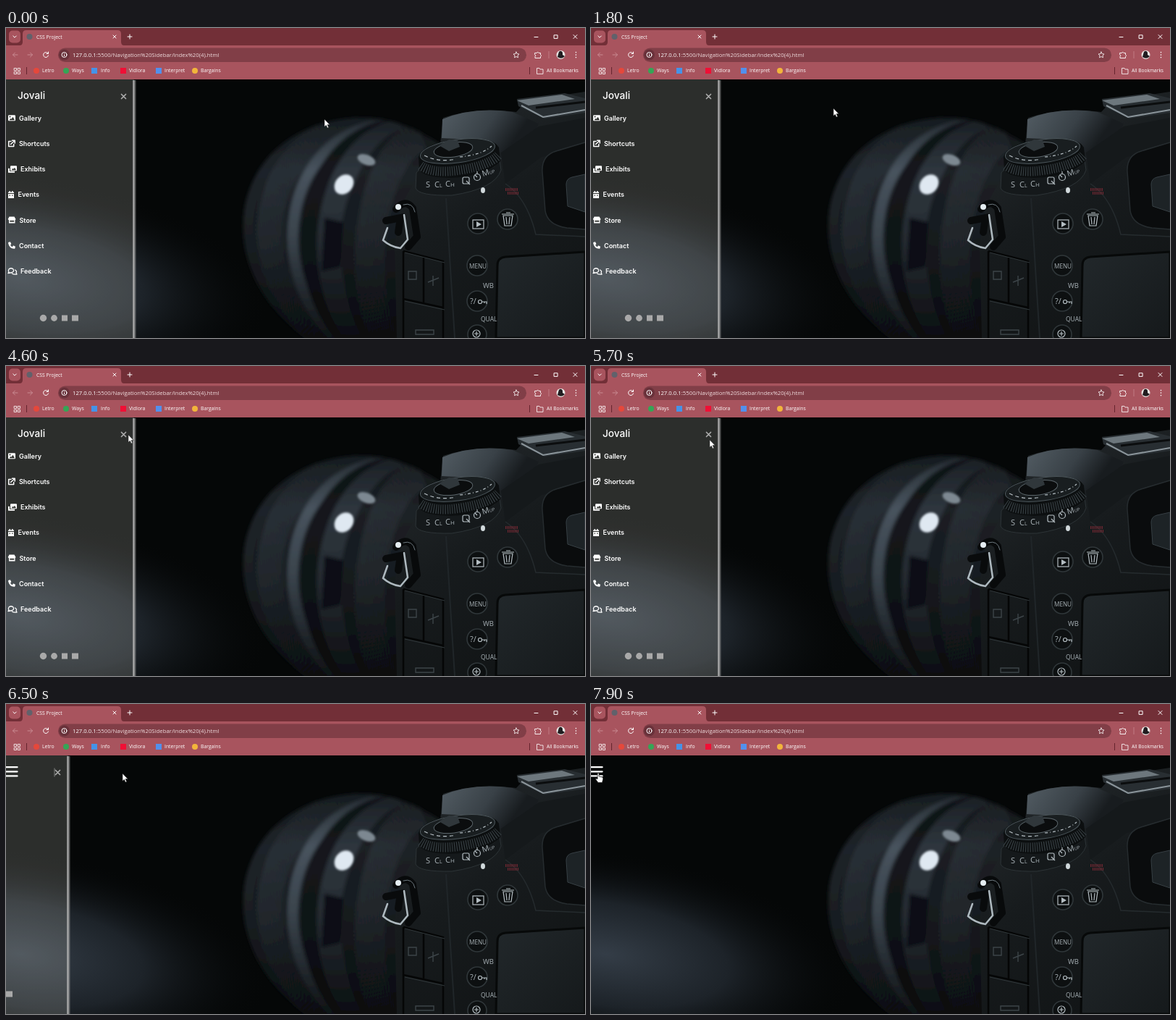
These frames come from a looping animation (800 by 428 pixels, 8000 ms). An HTML page:

```html
<!DOCTYPE html>
<html lang="en">
<head>
<meta charset="utf-8">
<title>Sidebar</title>
<style>
html,body{margin:0;width:100%;height:100%;overflow:hidden;background:#050707}
svg{display:block;width:100%;height:100%}
.ui{font:6.85px "Open Sans","Noto Sans",sans-serif;fill:#fff}
.side{font:600 9px Inter,sans-serif;fill:#fff}
.cam{font:500 11px "Open Sans",sans-serif;fill:#aab3b8}
.line{fill:none;stroke:#fff;stroke-width:1;stroke-linecap:round;stroke-linejoin:round}
.dim{stroke:#c98b92}
.key{fill:#0d1011;stroke:#30373a;stroke-width:1.6}
.mark{fill:none;stroke:#b4bdc2;stroke-width:1.2}
</style>
</head>
<body>
<svg viewBox="0 0 800 428">
<defs>
  <radialGradient id="haze" cx="20" cy="345" r="340" gradientUnits="userSpaceOnUse" gradientTransform="matrix(1 .12 0 .42 0 198)">
    <stop stop-color="#343d47"/><stop offset=".5" stop-color="#1d2329"/><stop offset="1" stop-color="#060809" stop-opacity="0"/>
  </radialGradient>
  <linearGradient id="lensShade" x1="0" y1="120" x2="0" y2="428" gradientUnits="userSpaceOnUse">
    <stop stop-color="#06080a" stop-opacity=".55"/><stop offset=".25" stop-color="#06080a" stop-opacity=".05"/>
    <stop offset=".55" stop-color="#06080a" stop-opacity=".25"/><stop offset="1" stop-color="#06080a" stop-opacity=".88"/>
  </linearGradient>
  <linearGradient id="body" x1="550" y1="120" x2="740" y2="428" gradientUnits="userSpaceOnUse">
    <stop stop-color="#24292c"/><stop offset=".45" stop-color="#171b1d"/><stop offset="1" stop-color="#111415"/>
  </linearGradient>
  <linearGradient id="hump" x1="605" y1="112" x2="690" y2="172" gradientUnits="userSpaceOnUse">
    <stop stop-color="#525c63"/><stop offset=".6" stop-color="#394147"/><stop offset="1" stop-color="#181c1f"/>
  </linearGradient>
  <linearGradient id="screen" x1="0" y1="0" x2="1" y2="1">
    <stop stop-color="#22282b"/><stop offset="1" stop-color="#15191b"/>
  </linearGradient>
  <linearGradient id="edge">
    <stop stop-color="#aaa" stop-opacity=".15"/><stop offset=".3" stop-color="#b5b5b5"/><stop offset="1" stop-color="#999" stop-opacity="0"/>
  </linearGradient>
  <filter id="soft" x="-20%" y="-20%" width="140%" height="140%"><feGaussianBlur stdDeviation="2.6"/></filter>
  <filter id="glow" x="-50%" y="-50%" width="200%" height="200%"><feGaussianBlur stdDeviation="1.5"/></filter>
  <filter id="slight"><feGaussianBlur stdDeviation=".6"/></filter>
  <clipPath id="barrel"><path d="M490 124C310 130 270 330 420 432H600V160Q540 122 490 124"/></clipPath>
</defs>

<rect width="800" height="428" fill="#050707"/>
<rect y="71" width="800" height="357" fill="url(#haze)"/>

<!-- lens -->
<g filter="url(#soft)">
  <g clip-path="url(#barrel)">
    <rect x="320" y="110" width="290" height="330" fill="#1d2227"/>
    <g id="bands" fill="none"></g>
    <rect x="320" y="110" width="290" height="330" fill="url(#lensShade)"/>
    <path d="M440 262L466 268 462 330 436 336Z" fill="#0c0f12"/>
  </g>
</g>
<g filter="url(#glow)">
  <ellipse cx="467" cy="216" rx="12" ry="15" fill="#dfe8f1" transform="rotate(40 467 216)"/>
  <ellipse cx="498" cy="182" rx="13" ry="7" fill="#7d8891" transform="rotate(22 498 182)"/>
</g>

<!-- camera body -->
<path d="M540 430L537 300 546 245 572 198 600 160 604 124Q650 109 705 116L720 100 800 88V430Z" fill="url(#body)"/>
<path d="M603 126Q646 108 700 116L736 132 728 150 684 172 640 154 602 152Z" fill="url(#hump)"/>
<path d="M684 172L736 136 800 124V165L740 178 690 215Z" fill="#15191b"/>
<g filter="url(#slight)">
  <path d="M706 98L772 90 800 97V117L744 125 708 108Z" fill="#282e32"/>
  <path d="M706 100L768 92 786 98 722 107Z" fill="#6d777d"/>
  <path d="M712 107L742 123 800 113" fill="none" stroke="#8a949a" stroke-width="2"/>
  <path d="M732 110L800 102" stroke="#0b0d0e" stroke-width="3"/>
</g>
<path d="M800 158L760 170Q740 176 741 198L745 252Q748 272 775 276L800 278" fill="#0a0c0d" stroke="#262c2f" stroke-width="1.5"/>
<path d="M800 202L782 206Q774 208 774 216L776 246 800 254Z" fill="#1d2326" stroke="#363f44"/>
<path d="M690 215Q720 235 732 285L800 288" fill="none" stroke="#252b2e" stroke-width="1.5"/>

<!-- mode dial -->
<path d="M567 200Q570 190 620 197T682 183L684 196Q676 222 616 231 570 232 566 221Z" fill="#15191b" stroke="#2d3437"/>
<path d="M570 178Q575 160 622 154 672 148 681 165L683 184Q664 205 613 207 577 206 571 196Z" fill="#0c0f10"/>
<path d="M573 190Q590 202 628 196T680 176" fill="none" stroke="#353d41" stroke-width="13" stroke-dasharray="1.2 2"/>
<ellipse cx="624" cy="170" rx="52" ry="16" transform="rotate(-8 624 170)" fill="#191e20" stroke="#4c565b"/>
<ellipse cx="618" cy="168" rx="27" ry="10" transform="rotate(-8 618 168)" fill="#0b0d0e" stroke="#596368"/>
<path d="M598 162L612 154 624 155 627 164 612 170Z" fill="#30373b"/>
<path d="M627 178Q658 175 671 163" class="mark" stroke-dasharray="4 3 1 3"/>
<path d="M578 176Q598 186 622 181" class="mark" stroke-dasharray="5 4"/>
<g class="cam">
  <text x="580" y="220">S</text><text x="592" y="220">C<tspan font-size="7">L</tspan></text>
  <text x="607" y="219">C<tspan font-size="8">H</tspan></text>
  <text x="659" y="205" transform="rotate(-18 659 205)">M<tspan font-size="6">UP</tspan></text>
</g>
<rect x="631" y="206" width="9" height="9" rx="2" class="mark"/><path d="M636 211L641 216" class="mark"/>
<circle cx="651" cy="206" r="4.5" class="mark"/><path d="M651 201V198M651 206L648 203" class="mark"/>
<ellipse cx="659" cy="224" rx="3" ry="4" fill="#d1d9dc"/>
<path d="M690 223H708M693 228H708" stroke="#8b2c38" stroke-width="4" stroke-dasharray="1 1" opacity=".8"/>

<!-- strap ring and port doors -->
<g filter="url(#slight)" fill="none" stroke-linecap="round">
  <path d="M539 250Q552 235 562 249L568 288 556 302" stroke="#080a0b" stroke-width="10"/>
  <path d="M525 266L545 262 542 282" stroke="#090b0c" stroke-width="10"/>
  <path d="M527 276L521 293Q531 302 545 304L555 292 550 258" stroke="#aeb9bf" stroke-width="2.5"/>
  <circle cx="542" cy="247" r="4" fill="#e5edf2"/><path d="M549 244Q562 240 565 254" stroke="#6e7a81"/>
</g>
<path d="M549 308L604 322V428M549 374L604 386M577 315V380M549 308V428" fill="none" stroke="#050606" stroke-width="2.5"/>
<path d="M551 310L606 324M551 377L606 389" stroke="#30373a"/>
<path d="M556 336h11v11h-11zM583 351L598 345M590 342V356M566 417h25v6h-25z" fill="none" stroke="#3c4448" stroke-width="1.4"/>
<path d="M608 235L620 428" stroke="#202629" stroke-width="2"/>

<path d="M800 309L690 316Q679 317 679 328L677 428H800Z" fill="url(#screen)" stroke="#070909" stroke-width="3"/>
<g class="key">
  <circle cx="652" cy="270" r="14"/><circle cx="693" cy="264" r="14"/><circle cx="651" cy="328" r="14"/>
  <circle cx="651" cy="377" r="14"/><circle cx="651" cy="423" r="13"/>
</g>
<rect x="645" y="265" width="15" height="12" class="mark"/><path d="M650 267L657 271 650 275Z" fill="#b4bdc2"/>
<path d="M687 259L689 273H698L700 259ZM685 257H702M691 255H697M691 261L692 271M696 261L695 271" class="mark"/>
<circle cx="650" cy="422" r="5" class="mark"/><path d="M647 422H653M650 419V425" class="mark"/>
<g class="cam">
  <text x="640" y="332" font-size="8.2">MENU</text>
  <text x="659" y="359" font-size="9.5">WB</text><text x="656" y="405" font-size="8.5">QUAL</text>
  <text x="641" y="381">?/</text>
</g>
<circle cx="655" cy="378" r="2.5" class="mark"/><path d="M658 378H664V381M661 378V380" class="mark"/>

<!-- sidebar -->
<g id="sidebar">
  <rect y="71" width="177" height="357" fill="#d6d4cb" fill-opacity=".19"/>
  <rect x="174.5" y="72" width="6" height="356" fill="url(#edge)"/>
  <text x="16" y="98" class="side" style="font-size:13.6px;font-weight:500">Jovali</text>
  <path d="M159.500 91.500L165.500 97.500M165.500 91.500L159.500 97.500" class="line" style="stroke:#aaa;stroke-width:1.7"/>
  <path id="focus" d="M158 88.500V100.500" stroke="#aaa" stroke-width=".7"/>
  <g id="items" class="side"></g>
  <g fill="#a9a9a9">
    <circle cx="51.5" cy="400.5" r="4.7"/><circle cx="66.5" cy="400.5" r="4.4"/>
    <rect x="77" y="396.5" width="8" height="8"/><rect x="91" y="396.5" width="9" height="8"/>
  </g>
</g>
<path id="burger" d="M0 87.200H15.500M0 93.300H15.500M0 99.400H15.500" class="line" style="stroke-width:2.3"/>

<!-- browser -->
<rect width="800" height="24" fill="#722f37"/>
<path d="M19 24Q23 24 23 19V8Q23 3 28 3H154Q159 3 159 8V19Q159 24 163 24H800V71H0V24Z" fill="#a8545e"/>
<rect x="4" y="3.5" width="16" height="17" rx="5" fill="#a8545e"/>
<path d="M9.800 11L12 13.200 14.200 11" class="line"/>
<circle cx="32.5" cy="12" r="4" fill="#61616b"/>
<path d="M148 10L152 14M152 10L148 14M168 12H174M171 9V15M730 12.500H735M784 9.500L789 14.500M789 9.500L784 14.500" class="line"/>
<rect x="757.5" y="9.8" width="4.6" height="4.6" class="line"/>
<path d="M16 37H9.500M12.500 34L9.500 37 12.500 40M30 37H36.500M33.500 34L36.500 37 33.500 40" class="line dim"/>
<path d="M58 35A3.500 3.500 0 1 0 58.500 38M58.500 33V35.500H56" class="line"/>
<rect x="72" y="27.5" width="647" height="19.5" rx="9.7" fill="#813e47"/>
<circle cx="80.5" cy="37" r="7.5" fill="#69313a"/>
<circle cx="80.5" cy="37" r="3.5" class="line"/><path d="M80.500 37V38.700M80.500 35.200V35.300" class="line"/>
<path d="M705 33L706.200 35.600 709 36 707 38 707.500 40.800 705 39.500 702.500 40.800 703 38 701 36 703.800 35.600Z" class="line" style="stroke-width:.8"/>
<path d="M731 34.500H733.500Q734.500 31.500 736 34.500H738.500V37Q741 38 738.500 39.500V41.500H731V39.500Q733 38 731 37Z" class="line" style="stroke-width:.9"/>
<path d="M750 32V42" stroke="#c07b83"/>
<circle cx="766.5" cy="37" r="6" fill="#e9e6e3"/>
<path d="M762 40Q763 36 764 33 767 30 769 34L769 37 772 39Q768 44 762 40Z" fill="#211d20"/>
<path d="M787.500 33.500V33.600M787.500 37V37.100M787.500 40.500V40.600" class="line" style="stroke-width:1.6"/>
<path d="M11.500 55.500h3v3h-3zM16.500 55.500h3v3h-3zM11.500 60.500h3v3h-3zM16.500 60.500h3v3h-3z" class="line" style="stroke-width:.8"/>
<path d="M28.500 54V64M723.500 54V64" stroke="#65242e"/>
<path d="M733.500 63V55.500H737L738 57H742V63Z" class="line" style="stroke-width:.8"/>
<g class="ui">
  <text x="42" y="14.6">CSS Project</text>
  <text x="92" y="40" style="font-size:7.75px">127.0.0.1<tspan fill="#f0dcde">:5500/Navigation%20Sidebar/index%20(4).html</tspan></text>
  <text x="747" y="61.3" style="font-size:6.6px">All Bookmarks</text>
  <g id="marks"></g>
</g>

<path id="arrow" d="M0 0V10.300L2.400 8.200 4 12 5.700 11.200 4.100 7.600H7.300Z" fill="#fff" stroke="#222" stroke-width=".5"/>
<path id="hand" d="M-1 1Q0-.8 1 1V5L5.500 6Q7 6.500 6.700 8.500L5.500 13.500H-.200L-3.500 9Q-3.800 7-1 8.500Z" fill="#fff" stroke="#111" stroke-width=".7"/>
</svg>

<script>
const $ = id => document.getElementById(id);

// Lens rings: [depth, width, colour, ribbed]
const ring = u => `M${490 + 90 * u} ${124 + 25 * u}C${310 + 200 * u} ${130 + 45 * u} ${270 + 225 * u} ${330 + 30 * u} ${420 + 110 * u} 432`;
$('bands').innerHTML = [
  [.03, 16, '#20262b'], [.2, 36, '#343d45', 1], [.37, 15, '#4b5762'], [.49, 22, '#14181c'],
  [.64, 32, '#303840'], [.79, 18, '#1c2126'], [.95, 42, '#343b42', 1]
].map(([u, width, color, ribbed]) => {
  const path = extra => `<path d="${ring(u)}" stroke-width="${width}" ${extra}/>`;
  return path(`stroke="${color}"`) + (ribbed ? path('stroke="#080b0d" stroke-dasharray="2.5 3" opacity=".6"') : '');
}).join('');

// Bookmarks: [icon x, text x, label, colour, square icon]
$('marks').innerHTML = [
  [42, 50, 'Letro', '#e5483b'], [83, 91, 'Ways', '#35a556'], [122, 131, 'Info', '#4593e8', 1],
  [162, 170, 'Vidlora', '#f00f35', 1], [211, 219, 'Interpret', '#5290ed', 1], [261, 269, 'Bargains', '#f2b53b']
].map(([x, textX, label, color, square]) =>
  `<rect x="${x - 4}" y="55" width="8" height="8" rx="${square ? 0 : 4}" fill="${color}"/><text x="${textX}" y="61.3">${label}</text>`
).join('');

const shift = (x, y) => `matrix(1 0 0 1 ${x} ${y})`;

// Menu items: [label, text x, icon centred on y = 0]
const cut = 'fill="#30322f"';
$('items').innerHTML = [
  ['Gallery', 18, `<rect x="3" y="-4" width="10" height="8" rx="1.2"/><path ${cut} d="M4.500 3L6.500 .5 7.500 1.500 9.500-1.500 12 3Z"/><circle ${cut} cx="5.5" cy="-1.8" r="1"/>`],
  ['Shortcuts', 18, '<path class="line" style="stroke-width:1.5" d="M7-3H3.700V4H10.700V1M6.500 1L12-4M8.500-4.200H12.200V-.5"/>'],
  ['Exhibits', 20, `<path d="M3-1H5V3H12V5H3Z"/><rect x="6" y="-4.5" width="9" height="7" rx="1"/><path ${cut} d="M7.500 1.500L9.500-1 10.500 0 12-2 14 1.500Z"/>`],
  ['Events', 16.5, `<path d="M3-3.500H4.500V-5H6V-3.500H8V-5H9.500V-3.500H11V5H3Z"/><path ${cut} d="M3-1.800H11V-1H3ZM4.500 .5H6V1.800H4.500ZM8 .5H9.500V1.800H8Z"/>`],
  ['Store', 18.5, `<path d="M4.500-4.500H11.500L13.500-1 12.500 .5V4.500H4V.5L2.700-1Z"/><path ${cut} d="M5.300 .7H11.200V2.500H5.300Z"/>`],
  ['Contact', 18, '<path d="M3.500-4.500L6-5 7.300-2 6-.8Q7 1.200 8.800 2L10-.1 13 1.500 12.200 4.500Q4.500 5 3-3.500Z"/>'],
  ['Feedback', 20, '<path class="line" style="stroke-width:1.3" d="M4 1.700Q2.500-.3 4-2.500 7-5 10-2.500 11.500 .5 8.500 2 6 2.500 3 3ZM12.500-1.500Q15.500 0 14 2.500L15 4.500Q10.500 5 8.500 3.500"/>']
].map(([label, x, icon], i) =>
  `<g transform="${shift(0, 124.3 + 35.2 * i)}">${icon}<text x="${x}" y="3.5">${label}</text></g>`
).join('');

const smooth = p => p * p * (3 - 2 * p);
const progress = (t, from, to) => smooth(Math.min(1, Math.max(0, (t - from) / (to - from))));

// Pointer stops: [ms, x, y]
const stops = [
  [0, 440, 126], [1000, 440, 126], [1800, 335, 111], [1900, 252, 100], [2200, 252, 100], [2900, 169, 95],
  [5200, 169, 95], [5700, 164, 102], [5900, 161, 96], [6800, 161, 96], [7700, 14, 103], [7800, 14, 103], [7900, 10, 95]
];
function pointerAt(t) {
  const next = stops.findIndex(stop => stop[0] > t);
  if (next < 0) return stops.at(-1).slice(1);
  const [t0, x0, y0] = stops[next - 1], [t1, x1, y1] = stops[next];
  const p = progress(t, t0, t1);
  return [x0 + (x1 - x0) * p, y0 + (y1 - y0) * p];
}

const show = (id, on) => $(id).setAttribute('visibility', on ? 'visible' : 'hidden');
const place = (id, x, y) => $(id).setAttribute('transform', shift(x, y));
const start = performance.now();

function draw() {
  // Motion advances in steps of 100 ms.
  const t = Math.floor((performance.now() - start) % 8000 / 100) * 100;
  const [x, y] = pointerAt(t);
  const overClose = t >= 5900 && t < 6400;
  const overBurger = x < 17;
  const pointing = overClose || overBurger;
  place('sidebar', -182 * progress(t, 6260, 6740), 0);
  place('arrow', x, y);
  place('hand', x, y);
  show('arrow', !pointing);
  show('hand', pointing);
  show('burger', t >= 6300);
  show('focus', t >= 6300);
  requestAnimationFrame(draw);
}
draw();
</script>
</body>
</html>
```
